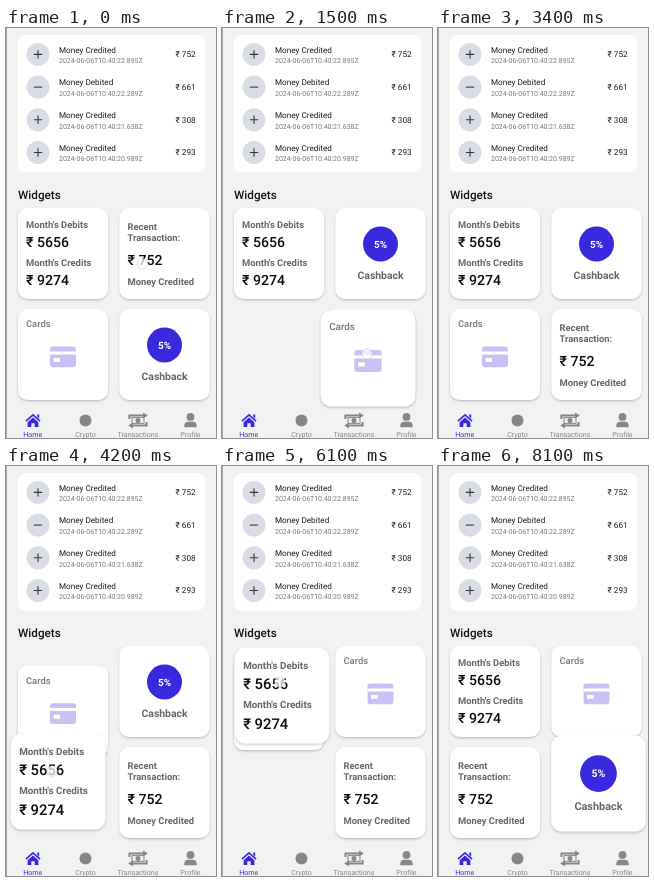
These frames come from a looping animation (210x410 px, 8200 ms). An HTML page:

```html
<!DOCTYPE html>
<html lang="en">
<head>
<meta charset="utf-8">
<title>Draggable widgets</title>
<style>
  html, body { margin: 0; width: 100%; height: 100%; overflow: hidden; background: #f2f2f3; }
  svg { display: block; width: 100%; height: 100%; }
  text { font-family: Roboto, "Noto Sans", sans-serif; fill: #1b1b1e; text-rendering: geometricPrecision; }
  .name { font-size: 8.16px; }
  .date { font-size: 6.95px; fill: #74767b; }
  .sum { font-size: 8.16px; text-anchor: end; }
  .head { font-size: 11.7px; font-weight: 500; fill: #111; }
  .label { font-size: 9.4px; font-weight: 600; fill: #66676e; }
  .light { font-weight: 500; fill: #75767d; }
  .big { font-size: 14.1px; font-weight: 500; fill: #0c0c0e; }
  .mid { text-anchor: middle; }
  .tab { font-size: 7.1px; text-anchor: middle; fill: #85868b; }
  .tab.on { fill: #3a28df; }
</style>
</head>
<body>
<svg id="stage" viewBox="0 0 210 410" xmlns="http://www.w3.org/2000/svg">
  <defs>
    <filter id="shade" x="-20%" y="-20%" width="140%" height="140%">
      <feDropShadow dx="0" dy="1.2" stdDeviation="1.3" flood-color="#000" flood-opacity=".24"/>
    </filter>
  </defs>
  <rect width="210" height="410" fill="#f2f2f3"/>
  <rect width="1" height="410" fill="#a9a9ac"/>
  <rect x="12" y="7" width="187" height="137.5" rx="8" fill="#fff"/>
  <g id="rows"></g>
  <text class="head" x="12" y="171">Widgets</text>

  <g fill="#3a28df">
    <path d="M27 385.8 L34.6 392.6 L33.5 393.8 L27 388 L20.5 393.8 L19.4 392.6 Z M31.2 386.5 h2 v4 l-2 -1.8 Z"/>
    <path d="M27 389.4 L32.4 394.2 V399 H28.7 V395.2 H25.3 V399 H21.6 V394.2 Z"/>
  </g>
  <g fill="#85868b">
    <circle cx="79.5" cy="392.5" r="6"/>
    <circle cx="184.5" cy="388.9" r="3.9"/>
    <path d="M178.3 399.3 v-1.8 q0 -3.8 4 -3.8 h4.4 q4 0 4 3.8 v1.8 Z"/>
    <path d="M122.4 391 v-4.6 h14.6 v-2 l4.8 3 -4.8 3 v-2 h-12.6 v2.6 Z"/>
    <path d="M141.6 394 v4.6 h-14.6 v2 l-4.8 -3 4.8 -3 v2 h12.6 v-2.6 Z"/>
    <rect x="126" y="389.6" width="12" height="5.8" fill="none" stroke="#85868b"/>
    <circle cx="132" cy="392.5" r="2.5"/>
  </g>
  <g id="tabs"></g>

  <g id="cards"></g>
  <circle id="touch" r="5.3" fill="#fff" fill-opacity=".72" stroke="#aaa" stroke-opacity=".55" stroke-width=".7"/>
</svg>
<script>
const LOOP = 8200, W = 90, H = 91, LIFT = 150, SLIDE = 350, SETTLE = 250;
const $ = id => document.getElementById(id);
const text = (cls, x, y, s) => `<text class="${cls}" x="${x}" y="${y}">${s}</text>`;

const rows = [['Credited', '22.895', 752], ['Debited', '22.289', 661],
              ['Credited', '21.638', 308], ['Credited', '20.989', 293]];
$('rows').innerHTML = rows.map(([kind, sec, sum], i) => {
  const y = 26.4 + i * 32.7;
  const sign = `M27.8 ${y} h8.4` + (kind === 'Credited' ? ` M32 ${y - 4.2} v8.4` : '');
  return `<circle cx="32" cy="${y}" r="11.5" fill="#dadde5"/>
    <path d="${sign}" stroke="#33353a" stroke-width="1.1"/>` +
    text('name', 53, y - 1.8, 'Money ' + kind) +
    text('date', 53, y + 8.8, `2024-06-06T10:40:${sec}Z`) +
    text('sum', 189.6, y + 2.9, '₹ ' + sum);
}).join('');

$('tabs').innerHTML = [[26.7, 'Home'], [79.5, 'Crypto'], [132, 'Transactions'], [184.5, 'Profile']]
  .map(([x, s], i) => text(i ? 'tab' : 'tab on', x, 409, s)).join('');

const content = {
  totals: text('label', 8, 20.3, "Month's Debits") + text('big', 8, 39.3, '₹ 5656') +
          text('label', 8, 57.6, "Month's Credits") + text('big', 8, 77, '₹ 9274'),
  recent: text('label', 8, 21.6, 'Recent') + text('label', 8, 33, 'Transaction:') +
          text('big', 8, 57.4, '₹ 752') + text('label', 8, 76.5, 'Money Credited'),
  cards: text('label light', 8, 18.3, 'Cards') +
         `<rect x="32" y="37.5" width="26" height="20.8" rx="2.8" fill="#c8c1f5"/>
          <path d="M32 42.4 h26 v3 h-26 Z M35.6 49 h6.4 v4 h-6.4 Z" fill="#fff"/>`,
  cashback: `<circle cx="45" cy="36" r="17.5" fill="#3a28df"/>
    <text class="mid" x="45" y="39.6" font-size="10" font-weight="700" style="fill:#fff">5%</text>
    <text class="label mid" x="45" y="70.5" style="font-size:10.4px">Cashback</text>`
};

const cards = {};
for (const id in content) {
  const g = document.createElementNS('http://www.w3.org/2000/svg', 'g');
  g.innerHTML = `<rect width="${W}" height="${H}" rx="10" fill="#fff" filter="url(#shade)"/>` + content[id];
  $('cards').append(g);
  cards[id] = g;
}

const slots = [[12, 180], [113.5, 180], [12, 281], [113.5, 281]];
const start = { totals: 0, recent: 1, cards: 2, cashback: 3 };

// Each move: dragged card, displaced card, slots, held point, grip inside the card, times.
const move = (id, other, from, to, held, grip, press, arrive, swap, drop) =>
  ({ id, other, from: slots[from], to: slots[to], held, grip, press, arrive, swap, drop });
const moves = [
  move('recent', 'cashback', 1, 3, [114, 284], [23, 56], 0, 560, 430, 680),
  move('cards', 'recent', 2, 3, [101, 285], [44, 41], 950, 1480, 1432, 1640),
  move('recent', 'cards', 2, 3, [110, 287], [49, 39], 1950, 2620, 2482, 2900),
  move('totals', 'cards', 0, 2, [7, 270], [39, 35], 3500, 4120, 3950, 4480),
  move('cards', 'cashback', 0, 1, [111, 182], [45, 40], 4950, 5400, 5270, 5530),
  move('totals', 'cashback', 2, 0, [15, 184], [43, 32], 5760, 6080, 6022, 6480),
  move('cashback', 'recent', 2, 3, [115.5, 272], [45, 36], 7220, 7800, 7620, 8090)
];

const ease = k => { k = Math.max(0, Math.min(1, k)); return k * k * (3 - 2 * k); };
const mix = (a, b, k) => a.map((v, i) => v + (b[i] - v) * k);

function draw(t) {
  const pos = {}, lift = {};
  let top = null, touch = null;
  for (const id in start) { pos[id] = slots[start[id]]; lift[id] = 0; }
  for (const m of moves) {
    if (t < m.press) break;
    const go = m.press + LIFT;
    const drop = ease((t - m.drop) / SETTLE);
    const path = mix(m.from, m.held, ease((t - go) / (m.arrive - go)));
    pos[m.id] = mix(path, m.to, drop);
    lift[m.id] = ease((t - m.press) / LIFT) * (1 - drop);
    if (t >= m.swap) pos[m.other] = mix(m.to, m.from, ease((t - m.swap) / SLIDE));
    top = m.id;
    touch = t < m.drop ? [pos[m.id][0] + m.grip[0], pos[m.id][1] + m.grip[1]] : null;
  }
  for (const id in cards) {
    const [x, y] = pos[id];
    cards[id].setAttribute('transform',
      `translate(${x + W / 2} ${y + H / 2}) scale(${1 + 0.05 * lift[id]}) translate(${-W / 2} ${-H / 2})`);
  }
  if ($('cards').lastChild !== cards[top]) $('cards').append(cards[top]);
  $('touch').setAttribute('visibility', touch ? 'visible' : 'hidden');
  if (touch) $('touch').setAttribute('transform', `translate(${touch})`);
}

const begin = performance.now();
function tick() {
  draw((performance.now() - begin) % LOOP);
  requestAnimationFrame(tick);
}
tick();
</script>
</body>
</html>
```
